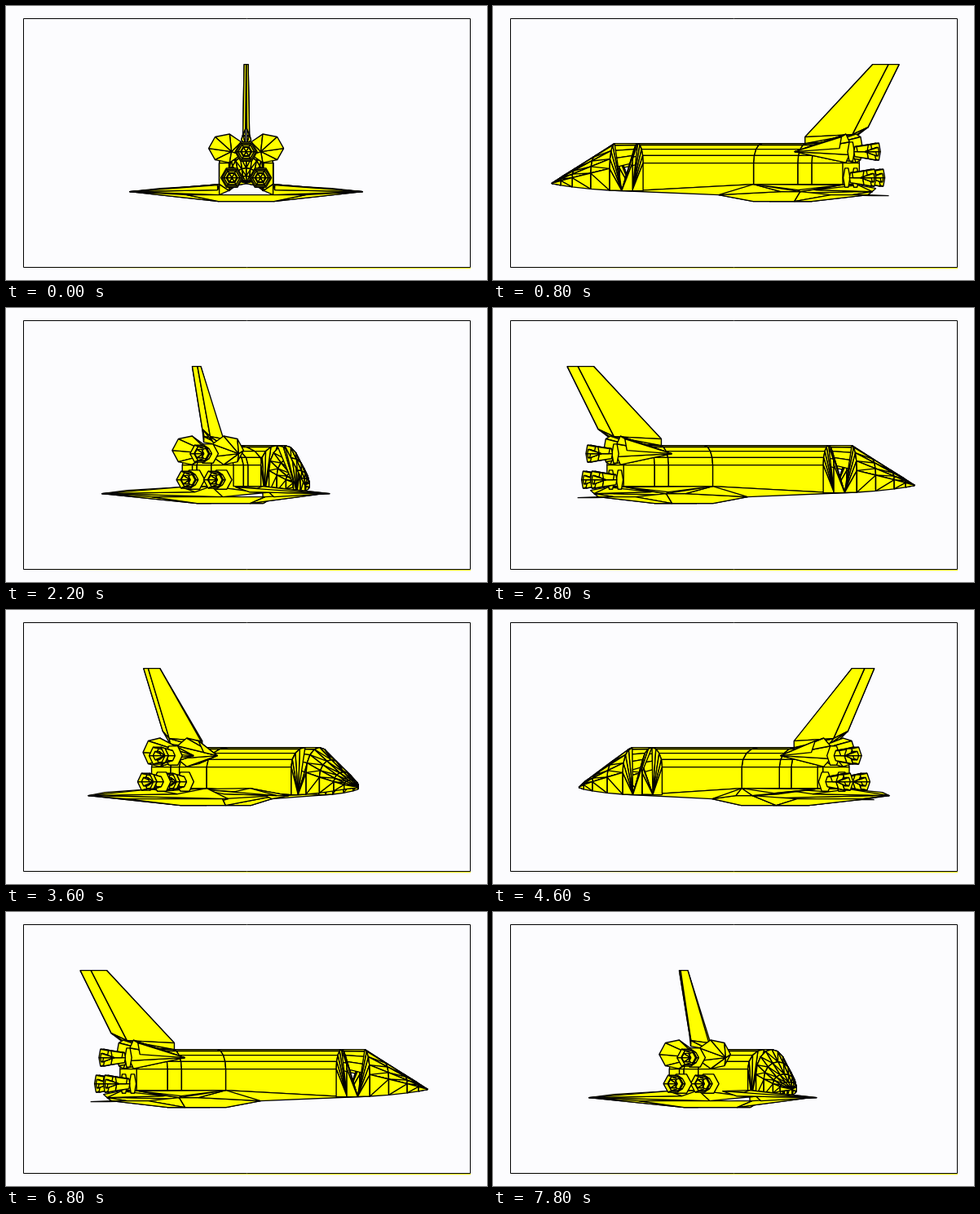
An HTML page with a canvas for the animation above (8000 ms loop, 590 by 336 pixels).

```html
<!DOCTYPE html>
<html lang="en">
<meta charset="utf-8">
<title>Rotating shuttle</title>
<style>
  html, body { margin: 0; width: 100%; height: 100%; overflow: hidden; background: #fcfcfe; }
  canvas { display: block; }
</style>
<canvas id="stage" width="590" height="336"></canvas>
<script>
const ctx = document.getElementById('stage').getContext('2d');
const YELLOW = '#ffff00', CENTER = 294.6, DROP = 0.6, STEPS = 20, STEP_MS = 200;
let cos = 1, sin = 0;

const clamp = v => Math.min(1, Math.max(0, v));
const mix = (a, b, t) => a + (b - a) * clamp(t);

// Points are [x sideways, y down the stage, z towards the nose].
function face(side, ...points) {
  ctx.beginPath();
  for (const [x, y, z] of points)
    ctx.lineTo(CENTER + side * x * cos - z * sin, y + DROP);
  ctx.closePath();
  ctx.fill();
  ctx.stroke();
}

function fan(side, apex, points) {
  for (let i = 0; i + 1 < points.length; i++) face(side, apex, points[i], points[i + 1]);
}

// Skins the strip between two rows of points.
function skin(side, a, b, split) {
  for (let i = 0; i + 1 < a.length; i++) {
    face(side, a[i], a[i + 1], b[i + 1], b[i]);
    if (split) face(side, a[i], a[i + 1], b[i]);
  }
}

function ring(x, y, z, rx, ry = rx, count = 6) {
  return Array.from({ length: count + 1 }, (_, i) => {
    const a = i * 2 * Math.PI / count;
    return [x + rx * Math.cos(a), y + ry * Math.sin(a), z];
  });
}

// Half of the hull's outline at z: an arch above a flat side.
function section(z) {
  const t = clamp((z - 123) / 111), narrow = (z + 37) / 160;
  const width = mix(33, 21, narrow) * Math.sqrt(1 - t * t);
  const top = mix(168, 217, (z - 153) / 81), waist = mix(192, 217, t);
  const bottom = mix(218, 226, narrow) - 9 * t * t;
  const arch = [0, 1, 2, 3, 4].map(i => {
    const a = i * Math.PI / 8;
    return [width * Math.sin(a), waist - (waist - top) * Math.cos(a), z];
  });
  return [...arch, [width, bottom, z]];
}

function loft(side, stations, split) {
  for (let i = 0; i + 1 < stations.length; i++)
    skin(side, section(stations[i]), section(stations[i + 1]), split);
}

// Key points of the underside and the wing.
const tipFront = [143, 227, -108], tipRear = [143, 227, -133],
  root = [33, 218, -37], rootRear = [35, 219, -150],
  keel = [34, 239, -37], keelRear = [34, 239, -90],
  strake = [33, 231, 8], elevon = [73, 231, -150], flap = [33, 232, -190];
const flip = ([x, y, z]) => [-x, y, z];
const across = (a, b) => face(1, a, b, flip(b), flip(a));

function hull(s) {
  loft(s, [-152, -112, -94, -37, 123]);
  face(s, root, section(123)[5], section(153)[5], strake, keel);
}

function nose(s) {
  const front = section(123), back = section(153), chin = section(137)[5];
  skin(s, front.slice(0, 5), back.slice(0, 5));
  fan(s, chin, front);
  fan(s, chin, back);
  loft(s, [153, 178, 203, 219, 234], true);
}

function wing(s) {
  face(s, keel, strake, tipFront, tipRear, keelRear);
  face(s, keelRear, tipRear, elevon);
  face(s, root, tipFront, strake);
  face(s, root, tipFront, tipRear, [105, 223, -150], rootRear);
  fan(s, tipRear, [root, [35, 225, -95], rootRear]);
}

function pod(s) {
  fan(s, [18, 178, -85], ring(25, 174, -152, 21, 18, 7));
}

function fin(s) {
  const top = [2.5, 71, -201], heel = [0, 148, -174], mid = [4, 157, -155], toe = [1, 160, -93];
  face(s, [0, 71, -214], top, mid, heel);
  face(s, top, [0, 71, -180], toe, mid);
  fan(s, mid, [heel, [6, 164, -150], [1, 168, -93], toe]);
}

function engine(x, y) {
  const hub = ring(x, y, -152, 13.5), neck = ring(x, y, -158, 7), mouth = ring(x, y, -186, 12);
  face(1, ...hub);
  skin(1, neck, ring(x, y, -176, 10));
  skin(1, ring(x, y, -176, 10), mouth);
  fan(1, [x, y, -170], ring(x, y, -186, 6));
}

function border() {
  const glow = ctx.createLinearGradient(21, 0, 400, 0);
  glow.addColorStop(0, 'rgba(255,255,0,0)');
  glow.addColorStop(1, YELLOW);
  ctx.fillStyle = glow;
  ctx.fillRect(21, 321, 549, 1);
  ctx.lineWidth = 1;
  ctx.strokeRect(21.5, 15.5, 548, 305);
}

function draw(now) {
  const turn = Math.floor(now / STEP_MS) % STEPS * 2 * Math.PI / STEPS;
  cos = Math.cos(turn);
  sin = Math.sin(turn);
  ctx.fillStyle = '#fcfcfe';
  ctx.fillRect(0, 0, 590, 336);
  ctx.strokeStyle = '#000';
  border();
  ctx.fillStyle = YELLOW;
  ctx.lineWidth = 1.4;
  ctx.lineJoin = 'bevel';
  // The paint order is fixed, whichever way the model faces.
  across(keel, keelRear);
  across(elevon, flap);
  for (const part of [hull, nose, wing]) {
    part(1);
    part(-1);
  }
  across(elevon, keelRear);
  for (const part of [fin, pod]) {
    part(1);
    part(-1);
  }
  engine(0, 178);
  engine(17.5, 210);
  engine(-17.5, 210);
}

const start = performance.now();
function tick() {
  draw(performance.now() - start);
  requestAnimationFrame(tick);
}
tick();
</script>
</html>
```
